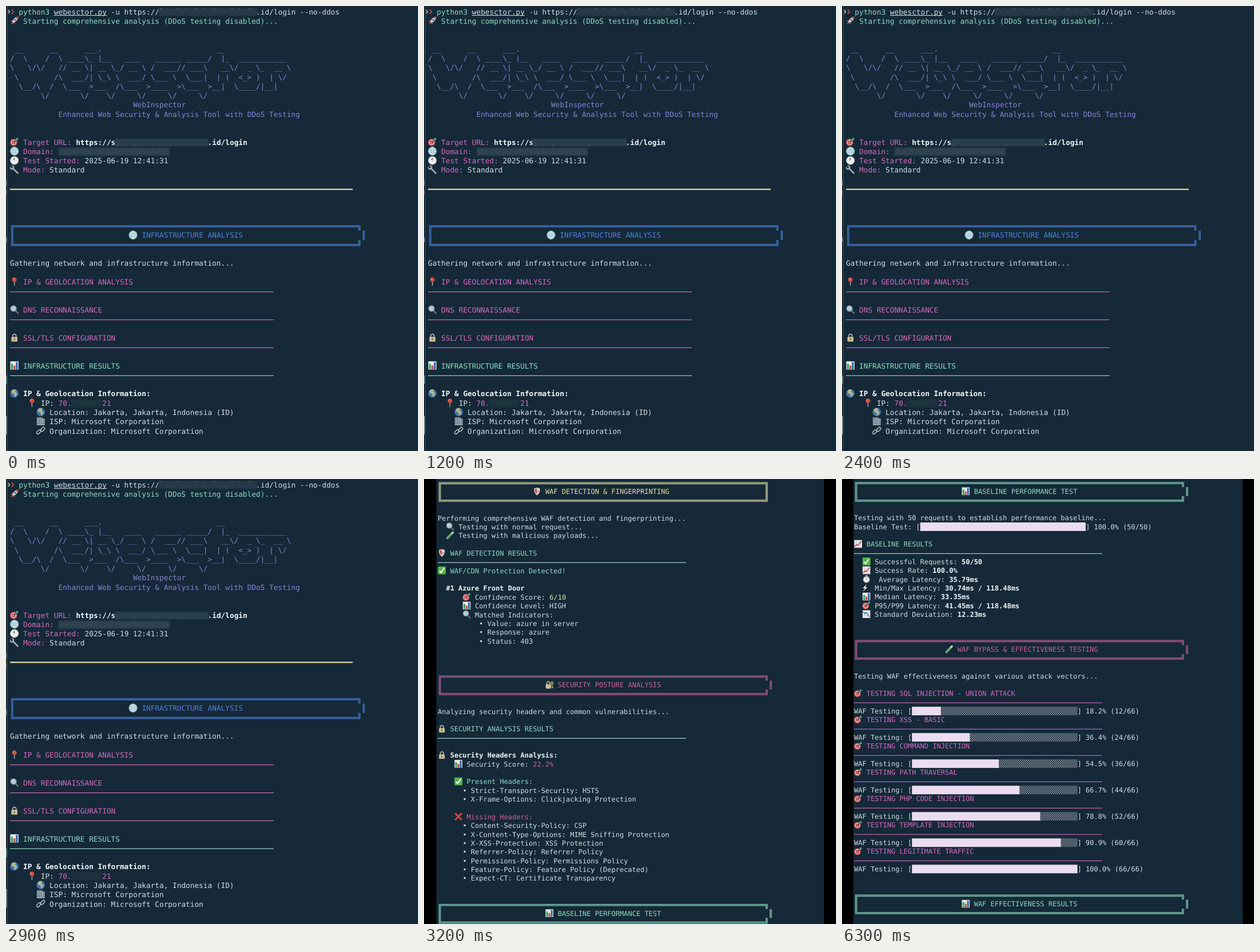
Animation of 720 by 778 pixels, one loop 8000 ms. Source, as an HTML page:

```html
<!DOCTYPE html>
<html lang="en">
<head>
<meta charset="utf-8">
<title>Terminal scan</title>
<style>
  html, body { margin: 0; width: 100%; height: 100%; overflow: hidden; background: #000; }
  #stage { position: absolute; left: 0; top: 0; display: block; }
  text { font-family: "DejaVu Sans Mono", Menlo, monospace; white-space: pre; text-rendering: geometricPrecision; }
  .scene { opacity: 0; animation: 8s step-end infinite; }
  #intro { animation-name: first; }
  #waf { animation-name: second; }
  #perf { animation-name: third; }
  @keyframes first { 0% { opacity: 1 } 37.5%, 100% { opacity: 0 } }
  @keyframes second { 0% { opacity: 0 } 37.5% { opacity: 1 } 75%, 100% { opacity: 0 } }
  @keyframes third { 0% { opacity: 0 } 75%, 100% { opacity: 1 } }
</style>
</head>
<body>
<svg id="stage" width="720" height="778" viewBox="0 0 720 778">
  <defs>
    <filter id="soft" x="-10%" y="-40%" width="120%" height="180%"><feGaussianBlur stdDeviation="0.9"/></filter>
    <pattern id="shade" width="3.615" height="3.84" patternUnits="userSpaceOnUse">
      <path d="M0 0h1.4v1.4H0zM1.8 1.9h1.4v1.4H1.8z" fill="#dcdbe4"/>
    </pattern>
    <symbol id="rocket" viewBox="0 0 16 16">
      <path d="M5 6 1 9l3 1zM10 11l-3 4-1-3z" fill="#d0473f"/>
      <path d="M15 1c-5 0-9 4-11 9l2 2c5-2 9-6 9-11z" fill="#c3ced6"/>
      <path d="M15 1c-2 0-4 .4-5 1l4 4c.6-1 1-3 1-5z" fill="#d0473f"/>
      <circle cx="9.5" cy="6.5" r="1.6" fill="#3b6688"/><path d="M4 11l1 1-3.500 3z" fill="#eaa64a"/>
    </symbol>
    <symbol id="dart" viewBox="0 0 16 16">
      <circle cx="6.6" cy="9" r="6.5" fill="#bd4a48"/><circle cx="6.6" cy="9" r="4.7" fill="#e6d8d3"/>
      <circle cx="6.6" cy="9" r="3.4" fill="#bd4a48"/><circle cx="6.6" cy="9" r="1.2" fill="#f0dfda"/>
      <path d="M6.6 9l6-5" stroke="#39434b" stroke-width="1.4"/><path d="M10 6l.6-3.500L13.500 0l.4 2.100 2 .4-2.600 3z" fill="#4f9a90"/>
    </symbol>
    <symbol id="globe" viewBox="0 0 16 16">
      <circle cx="8" cy="8" r="7.7" fill="#93bfca"/>
      <path d="M8 .6v14.8M.6 8h14.8M2 4.2h12M2 11.8h12M8 .6c-5 4-5 11 0 14.8M8 .6c5 4 5 11 0 14.8" fill="none" stroke="#e3f0f2" stroke-width=".9"/>
    </symbol>
    <symbol id="clock" viewBox="0 0 16 16">
      <circle cx="8" cy="8" r="7.2" fill="#eeeeea" stroke="#b5bbbe"/><path d="M8 8V3M8 8l-2-3" stroke="#4e565c"/>
    </symbol>
    <symbol id="wrench" viewBox="0 0 16 16">
      <path d="M5 5l9 9" stroke="#a4afb6" stroke-width="2.6" stroke-linecap="round"/>
      <path d="M3 1a3 3 0 1 1-2 2" fill="none" stroke="#a4afb6" stroke-width="2"/>
    </symbol>
    <symbol id="pin" viewBox="0 0 16 16">
      <path d="M8 8v7.5" stroke="#aab4ba" stroke-width="1.4"/><circle cx="8" cy="4.8" r="4.2" fill="#d2483e"/><circle cx="6.7" cy="3.5" r="1.1" fill="#f0a093"/>
    </symbol>
    <symbol id="lens" viewBox="0 0 16 16">
      <path d="M10 10l4.5 4.5" stroke="#6c777e" stroke-width="2.4" stroke-linecap="round"/>
      <circle cx="6.4" cy="6.2" r="5" fill="#b9cdd5" stroke="#8a979e" stroke-width="1.5"/>
    </symbol>
    <symbol id="lock" viewBox="0 0 16 16">
      <path d="M5 8V5a3 3 0 0 1 6 0v3" fill="none" stroke="#a9b1b3" stroke-width="1.8"/>
      <rect x="2.6" y="7" width="10.8" height="8.3" rx="1.2" fill="#cdbd90"/><path d="M8 9.6v3" stroke="#564a30" stroke-width="1.6"/>
    </symbol>
    <symbol id="keylock" viewBox="0 0 16 16">
      <path d="M3 8V5a2.8 2.8 0 0 1 5.6 0v3" fill="none" stroke="#a9b1b3" stroke-width="1.8"/>
      <rect x="1" y="7" width="10" height="8.3" rx="1.2" fill="#cdbd90"/>
      <path d="M13 7v8M13 12h2M13 14h2" stroke="#cfad58" stroke-width="1.3"/><circle cx="13" cy="4.6" r="2" fill="none" stroke="#cfad58" stroke-width="1.5"/>
    </symbol>
    <symbol id="bars" viewBox="0 0 16 16">
      <rect x=".7" y=".7" width="14.6" height="14.6" fill="#e5ecee"/>
      <path d="M2 5h3.4v10H2z" fill="#45a05c"/><path d="M6.3 8h3.400v7H6.300z" fill="#cc5148"/><path d="M10.600 2H14v13h-3.400z" fill="#3268ad"/>
    </symbol>
    <symbol id="earth" viewBox="0 0 16 16">
      <circle cx="8" cy="8" r="7.5" fill="#3f74b4"/>
      <path d="M4 2c3-2 6-1 7 1L9 5l2 1 2 3-3 5-2-1-.5-4L4 8 2.6 5z" fill="#b3b886"/>
    </symbol>
    <symbol id="tower" viewBox="0 0 16 16">
      <path d="M1 1h10v2h4v12H1z" fill="#98a5ad"/><path d="M3 2v12M6 2v12M9 2v12M13 5v9" stroke="#536874" stroke-width="1.2" stroke-dasharray="2 1"/>
    </symbol>
    <symbol id="chain" viewBox="0 0 16 16">
      <g fill="none" stroke="#b2bdc3" stroke-width="1.6"><rect x="0" y="8" width="8.5" height="4.6" rx="2.3" transform="rotate(-45 4.2 10.3)"/><rect x="7.2" y="3.4" width="8.5" height="4.6" rx="2.3" transform="rotate(-45 11.4 5.7)"/></g>
    </symbol>
    <symbol id="shield" viewBox="0 0 16 16">
      <path d="M2.5 2.5 8 .8l5.5 1.7C14 9 11.5 13 8 15.4 4.5 13 2 9 2.5 2.5z" fill="#c9ced0"/>
      <path d="M4 4l4-1.4V13C5.5 11 4 8 4 4z" fill="#bf4a43"/><path d="M8 2.6 12 4c0 4-1.5 7-4 9z" fill="#e8dfd8"/><path d="M9 6.5h2.6L9 11z" fill="#bf4a43"/>
    </symbol>
    <symbol id="tube" viewBox="0 0 16 16">
      <path d="M3 13.3 13 2.7" stroke="#b7cbd0" stroke-width="4" stroke-linecap="round"/><path d="M3 13.3 10 5.9" stroke="#63a84c" stroke-width="3" stroke-linecap="round"/>
    </symbol>
    <symbol id="check" viewBox="0 0 16 16">
      <rect x=".5" y=".5" width="15" height="15" rx="2" fill="#55b548"/><path d="M3.5 8.5 6.5 12 12.5 3.5" fill="none" stroke="#fff" stroke-width="2.2"/>
    </symbol>
    <symbol id="cross" viewBox="0 0 16 16"><path d="M2.5 2.5l11 11M13.5 2.5l-11 11" stroke="#d4483d" stroke-width="3.2" stroke-linecap="round"/></symbol>
    <symbol id="rise" viewBox="0 0 16 16">
      <rect x=".7" y=".7" width="14.6" height="14.6" fill="#e8eaec"/><path d="M1 5.5h14M1 10.5h14M5.5 1v14M10.5 1v14" stroke="#bec9ce" stroke-width=".7"/><path d="M1.5 13 5 9l2.5 2L14 3" fill="none" stroke="#cb4a43" stroke-width="1.7"/>
    </symbol>
    <symbol id="fall" viewBox="0 0 16 16">
      <rect x=".7" y=".7" width="14.6" height="14.6" fill="#e8eaec"/><path d="M1 5.5h14M1 10.5h14M5.5 1v14M10.5 1v14" stroke="#bec9ce" stroke-width=".7"/><path d="M1.5 3 5 7l2.5-2L14 13" fill="none" stroke="#3f78b5" stroke-width="1.7"/>
    </symbol>
    <symbol id="watch" viewBox="0 0 16 16">
      <path d="M6.5 1h3v2.5h-3zM12 3l1.5 1.5" fill="#aab2b5" stroke="#aab2b5"/><circle cx="8" cy="9" r="5.7" fill="#eceeea" stroke="#a6aeb2" stroke-width="1.4"/><path d="M8 9V5.5" stroke="#c45b4b"/>
    </symbol>
    <symbol id="bolt" viewBox="0 0 16 16"><path d="M8.5 1 1 9h4l-3.5 6L10 7H6z" fill="#e4e5dc"/></symbol>
  </defs>
</svg>

<script>
const NS = 'http://www.w3.org/2000/svg';
const stage = document.getElementById('stage');
const BG = '#152938';
const INK = {
  w: '#d3dde1', b: '#f2f7f8', g: '#8cdcc0', p: '#8c80d6', k: '#d36ac0',
  m: '#ce609f', y: '#e3e0a4', u: '#4d80d6', l: '#a4d6cc', d: '#b964b4'
};

function add(parent, tag, attrs, text) {
  const el = document.createElementNS(NS, tag);
  for (const key in attrs) el.setAttribute(key, attrs[key]);
  if (text) el.textContent = text;
  return parent.appendChild(el);
}

// Markup: {c} ink, {12} column, @name icon, ~n rule, ^n bar of 40 cells, $0/$1 frame (1: right edge pushed out)
const TOKEN = /(\{\w+\}|@[a-z]+|~\d+|\^\d+|\$\d)/;

function scene({ id, x0, y0, cw, rh, left, right, rows }) {
  const g = add(stage, 'g', { id, class: 'scene' });
  add(g, 'rect', { width: 720, height: 778, fill: '#000' });
  add(g, 'rect', { x: left, width: right - left, height: 778, fill: BG });
  const size = cw / 0.60205;

  // Double line: two thin strokes over a faint wide one
  function frame(y, ink, pushed) {
    const l = x0 + cw / 2, r = x0 + 79.5 * cw, t = y + 0.5 - rh, b = y + 0.5 + rh, h = rh / 2;
    const outline = o => `M${r + o} ${y - h}V${t - o}H${l - o}V${b + o}H${r + o}V${y + h}`
      + `M${r + o + (pushed ? cw : 0)} ${y - h}v${rh}`;
    const stroke = (d, width, opacity) =>
      add(g, 'path', { d, fill: 'none', stroke: ink, 'stroke-width': width, opacity });
    stroke(outline(0), 3.4, 0.4);
    stroke(outline(1.2) + outline(-1.2), 1.2, 0.7);
  }

  for (const row of rows.trim().split('\n')) {
    const [, n, body] = row.match(/^(\d+) (.*)$/);
    const y = y0 + n * rh;
    let col = 0, ink = 'w';
    for (const part of body.split(TOKEN)) {
      if (!part) continue;
      const x = x0 + col * cw, arg = part.slice(1);
      if (!TOKEN.test(part)) {
        if (part.trim()) add(g, 'text', {
          x, y: y + size * 0.355, fill: INK[ink], 'font-size': size, 'font-weight': ink === 'b' ? 700 : 400
        }, part);
        col += part.length;
      } else if (part[0] === '{') {
        const key = part.slice(1, -1);
        if (INK[key]) ink = key; else col = +key;
      } else if (part[0] === '@') {
        add(g, 'use', { href: '#' + arg, x: x - 0.2, y: y - cw - 0.8, width: 2 * cw + 0.4, height: 2 * cw + 0.4 });
        col += 2;
      } else if (part[0] === '~') {
        const thick = ink === 'y' ? 2.2 : 1.2;
        add(g, 'rect', { x, y: y + 1 - thick / 2, width: arg * cw, height: thick, fill: INK[ink] });
      } else if (part[0] === '^') {
        const box = { y: y - rh / 2 + 0.2, height: rh - 0.4 };
        add(g, 'rect', { x: x + arg * cw, width: (40 - arg) * cw, fill: 'url(#shade)', ...box });
        add(g, 'rect', { x, width: arg * cw, fill: '#ebdcf1', ...box });
        col += 40;
      } else frame(y, INK[ink], +arg);
    }
  }
  return g;
}

const intro = scene({
  id: 'intro', x0: 7, y0: 10, cw: 7.68, rh: 16.29, left: 0, right: 720,
  rows: String.raw`
0 {2}{g}python3 {w}webesctor.py -u https://{56}.id/login --no-ddos
1 @rocket {g}Starting comprehensive analysis (DDoS testing disabled)...
4 {p} __      __      ___.                          __
5 {p}/  \    /  \ ____\_ |__   ____   ______ _____/  |_  ___________
6 {p}\   \/\/   // __ \| __ \_/ __ \ /  ___// ___\   __\/  _ \_  __ \
7 {p} \        /\  ___/| \_\ \  ___/ \___ \  \___|  | (  <_> )  | \/
8 {p}  \__/\  /  \___  >___  /\___  >____  >\___  >__|  \____/|__|
9 {p}       \/       \/    \/     \/     \/     \/
10 {28}{p}WebInspector
11 {11}{p}Enhanced Web Security & Analysis Tool with DDoS Testing
14 @dart {k}Target URL: {b}https://s{45}.id/login
15 @globe {k}Domain:
16 @clock {k}Test Started: {w}2025-06-19 12:41:31
17 @wrench {k}Mode: {w}Standard
19 {y}~78
24 {u}$1{27}@globe INFRASTRUCTURE ANALYSIS
27 Gathering network and infrastructure information...
29 @pin {k}IP & GEOLOCATION ANALYSIS
30 {k}~60
32 @lens {k}DNS RECONNAISSANCE
33 {k}~60
35 @lock {k}SSL/TLS CONFIGURATION
36 {k}~60
38 @bars {g}INFRASTRUCTURE RESULTS
39 {g}~60
41 @earth {b}IP & Geolocation Information:
42     @pin IP: {k}70.{21}21
43       @earth Location: Jakarta, Jakarta, Indonesia (ID)
44       @tower ISP: Microsoft Corporation
45       @chain Organization: Microsoft Corporation`
});

// Prompt, underlined script name, pane edge and blurred-out values
add(intro, 'path', { d: 'M4 7l2.5 3-2.5 3', fill: 'none', stroke: '#cfd8dc', 'stroke-width': 1.4 });
add(intro, 'path', { d: 'M10 6l3.2 4-3.2 4', fill: 'none', stroke: '#d0524c', 'stroke-width': 1.8 });
add(intro, 'rect', { x: 83.8, y: 16, width: 92.2, height: 1, fill: INK.w });
add(intro, 'rect', { x: 0, y: 0, width: 1.5, height: 778, fill: '#10202c' });
add(intro, 'rect', { x: 1.6, y: 0, width: 1, height: 778, fill: '#42535e' });
for (const [y, h, fill] of [[304, 10, '#5d6c72'], [322, 8, '#7c4664'], [404, 9, '#70808a'], [646, 15, '#6f9d90'], [717, 32, '#9db0a8']])
  add(intro, 'rect', { x: 0, y, width: 1.3, height: h, fill });
for (const [x, y, width, height, fill] of [
  [267, 4, 172, 13, '#253a47'], [190, 232, 164, 13, '#2a3f4b'], [92, 248, 194, 13.5, '#2f434f'], [114, 688, 53, 13, '#1b303e']
]) add(intro, 'rect', { x, y, width, height, fill, filter: 'url(#soft)' });
for (const [x, y, w] of [[268, 4.5, 165], [192, 244, 110]])
  add(intro, 'path', { d: `M${x} ${y}h${w}`, stroke: '#566975', 'stroke-width': 1, 'stroke-dasharray': '5 9 3 14', opacity: 0.7 });

scene({
  id: 'waf', x0: 24, y0: 22.2, cw: 7.23, rh: 15.364, left: 21.5, right: 699,
  rows: `
0 {y}$0{23}@shield {26}WAF DETECTION & FINGERPRINTING
3 Performing comprehensive WAF detection and fingerprinting...
4   @lens Testing with normal request...
5   @tube Testing with malicious payloads...
7 @shield {g}WAF DETECTION RESULTS
8 {l}~60
9 @check {g}WAF/CDN Protection Detected!
11 {b}  #1 Azure Front Door
12       @dart Confidence Score: {y}6/10
13       @bars Confidence Level: HIGH
14       @lens Matched Indicators:
15 {10}• Value: azure in server
16 {10}• Response: azure
17 {10}• Status: 403
22 {m}$1{26}@keylock SECURITY POSTURE ANALYSIS
25 Analyzing security headers and common vulnerabilities...
27 @lock {g}SECURITY ANALYSIS RESULTS
28 {l}~60
30 @lock {b}Security Headers Analysis:
31     @bars Security Score: {m}22.2%
33     @check {g}Present Headers:
34 {6}• Strict-Transport-Security: HSTS
35 {6}• X-Frame-Options: Clickjacking Protection
37     @cross {m}Missing Headers:
38 {6}• Content-Security-Policy: CSP
39 {6}• X-Content-Type-Options: MIME Sniffing Protection
40 {6}• X-XSS-Protection: XSS Protection
41 {6}• Referrer-Policy: Referrer Policy
42 {6}• Permissions-Policy: Permissions Policy
43 {6}• Feature-Policy: Feature Policy (Deprecated)
44 {6}• Expect-CT: Certificate Transparency
48 {g}$1{26}@bars BASELINE PERFORMANCE TEST`
});

const attacks = [
  ['SQL INJECTION - UNION ATTACK', 12], ['XSS - BASIC', 24], ['COMMAND INJECTION', 36], ['PATH TRAVERSAL', 44],
  ['PHP CODE INJECTION', 52], ['TEMPLATE INJECTION', 60], ['LEGITIMATE TRAFFIC', 66]
].map(([name, done], i) => {
  const r = 23 + 3 * i, share = done / 66;
  return `${r} @dart {k}TESTING ${name}
${r + 1} {d}~60
${r + 2} WAF Testing: [^${Math.floor(share * 40)}] ${(share * 100).toFixed(1)}% (${done}/66)`;
}).join('\n');

scene({
  id: 'perf', x0: 21, y0: 22, cw: 7.23, rh: 15.345, left: 20, right: 700,
  rows: `
0 {g}$1{26}@bars BASELINE PERFORMANCE TEST
3 Testing with 50 requests to establish performance baseline...
4 Baseline Test: [^40] 100.0% (50/50)
6 @rise {g}BASELINE RESULTS
7 {g}~60
8   @check Successful Requests: {b}50/50
9   @rise Success Rate: {b}100.0%
10   @watch  Average Latency: {b}35.79ms
11   @bolt Min/Max Latency: {b}30.74ms / 118.48ms
12   @bars Median Latency: {b}33.35ms
13   @dart P95/P99 Latency: {b}41.45ms / 118.48ms
14   @fall Standard Deviation: {b}12.23ms
18 {m}$1{22}@tube WAF BYPASS & EFFECTIVENESS TESTING
21 Testing WAF effectiveness against various attack vectors...
${attacks}
47 {g}$1{26}@bars WAF EFFECTIVENESS RESULTS`
});
</script>
</body>
</html>
```
